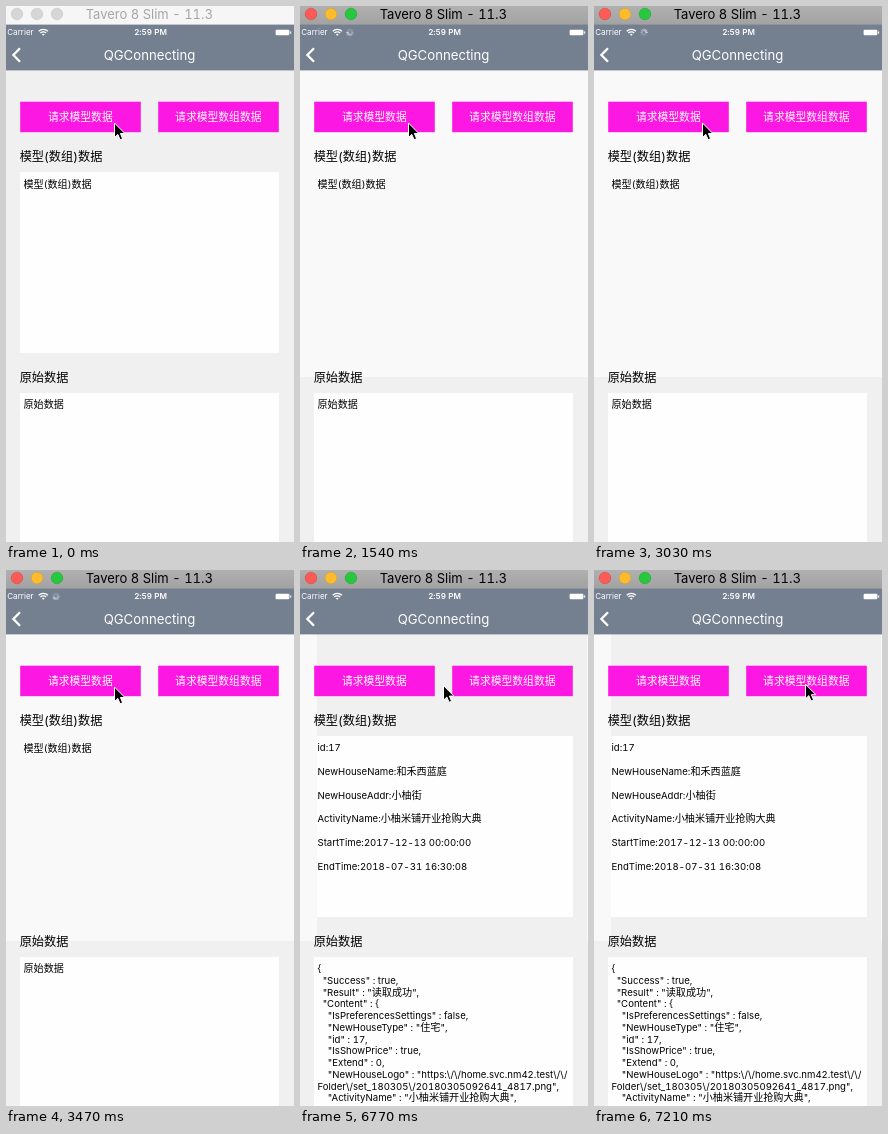
Recreate the animation shown at these times as an HTML page. Size 288 by 536 pixels, loop 8 s.

```html
<!DOCTYPE html>
<html lang="zh">
<head>
<meta charset="utf-8">
<title>Request demo</title>
<style>
  html, body { margin: 0; width: 100%; height: 100%; overflow: hidden; background: #f0f0f0; }
  svg { display: block; width: 100vw; height: 100vh; }
  text {
    font-family: Inter, "Noto Sans CJK SC", "Noto Sans CJK", sans-serif;
    font-feature-settings: "calt" 0, "tnum" 1;
    white-space: pre;
  }
  .mid { text-anchor: middle; }
  .head { font-size: 12.2px; }
  .body { font-size: 9.6px; }
  .body tspan { font-size: 10.1px; }
  .btn { font-size: 10.8px; fill: #fff; }
</style>
</head>
<body>
<svg viewBox="0 0 288 536" xmlns="http://www.w3.org/2000/svg">
  <linearGradient id="steel" x2="0" y2="1">
    <stop stop-color="#b0b0b0"/>
    <stop offset="1" stop-color="#a2a2a2"/>
  </linearGradient>
  <rect width="288" height="536" fill="#f0f0f0"/>
  <rect id="wash" y="64" width="288" height="307" fill="#f9f9f9"/>
  <rect id="fresh" x="17" y="64" width="270" height="307" fill="#f0f0f0"/>
  <rect id="topBox" y="166" height="181" fill="#fefefe"/>
  <rect x="14" y="387" width="259" height="149" fill="#fefefe"/>

  <rect id="bar" width="288" height="19"/>
  <g id="lights"></g>
  <text id="winTitle" class="mid" x="143.3" y="13" font-size="13">Tavero 8 Slim - 11.3</text>

  <rect y="18.6" width="288" height="45.8" fill="#747f90"/>
  <g fill="#fff">
    <text x="1.2" y="29.4" font-size="8.1">Carrier</text>
    <text class="mid" x="144.5" y="29.4" font-size="8.1" font-weight="600">2:59 PM</text>
    <text class="mid" x="143.5" y="54" font-size="13.2">QGConnecting</text>
    <rect x="269.6" y="23.8" width="13.8" height="5.4" rx="1.2"/>
    <rect x="284.2" y="25.3" width="1" height="2.4" rx=".5"/>
    <path d="M35.9 28.4a2.2 2.2 0 0 1 2.8 0L37.3 29.8z"/>
  </g>
  <g fill="none" stroke="#fff">
    <path d="M32.7 25.2a6.5 6.5 0 0 1 9.2 0M34.4 27a4.1 4.1 0 0 1 5.8 0" stroke-width="1.3"/>
    <path d="M14 42.3L7.4 49L14 55.7" stroke-width="2.3"/>
  </g>
  <g id="spinner" transform="translate(50 26.4)" stroke="#fff" stroke-width=".8" stroke-linecap="round"></g>

  <g fill="#fc18e2">
    <rect x="14.2" y="95.7" width="120.6" height="30.5"/>
    <rect x="152.2" y="95.7" width="120.6" height="30.5"/>
  </g>
  <text class="btn mid" x="74.3" y="115">请求模型数据</text>
  <text class="btn mid" x="212.3" y="115">请求模型数组数据</text>
  <text class="head" x="13.7" y="155.2">模型(数组)数据</text>
  <text class="head" x="13.7" y="375.7">原始数据</text>

  <g id="before"></g>
  <g id="after"></g>

  <path id="cursor" d="M0 0V14.6L3.3 11.4L5.6 16.7L8.1 15.7L5.9 10.5H10.4Z" fill="#000" stroke="#fff" stroke-width="1" stroke-linejoin="round"/>
</svg>
<script>
const LOOP = 8000, ACTIVE = 500, SPIN = 797, STEP = 148.5, LOADED = 3620, MOVE = 6770;
const NS = "http://www.w3.org/2000/svg";
const $ = id => document.getElementById(id);

function add(parent, tag, attrs) {
  const el = document.createElementNS(NS, tag);
  for (const k in attrs) el.setAttribute(k, attrs[k]);
  parent.appendChild(el);
  return el;
}

// Latin and Chinese runs have slightly different sizes
function addLine(parent, str, y) {
  const line = add(parent, "text", { class: "body", x: 17.5, y });
  for (const run of str.split(/([\u4e00-\u9fff]+)/)) {
    if (/[\u4e00-\u9fff]/.test(run)) add(line, "tspan", {}).textContent = run;
    else line.appendChild(document.createTextNode(run));
  }
}

const model = [
  "id:17",
  "NewHouseName:和禾西蓝庭",
  "NewHouseAddr:小柚街",
  "ActivityName:小柚米铺开业抢购大典",
  "StartTime:2017-12-13 00:00:00",
  "EndTime:2018-07-31 16:30:08"
];
const raw = String.raw`{
  "Success" : true,
  "Result" : "读取成功",
  "Content" : {
    "IsPreferencesSettings" : false,
    "NewHouseType" : "住宅",
    "id" : 17,
    "IsShowPrice" : true,
    "Extend" : 0,
    "NewHouseLogo" : "https:\/\/home.svc.nm42.test\/\/
Folder\/set_180305\/20180305092641_4817.png",
    "ActivityName" : "小柚米铺开业抢购大典",`.split("\n");

addLine($("before"), "模型(数组)数据", 181.5);
addLine($("before"), "原始数据", 402.2);
model.forEach((s, i) => addLine($("after"), s, 181.4 + i * 23.65));
raw.forEach((s, i) => addLine($("after"), s, 402.2 + i * 11.75));

const lights = [11, 31, 51].map(cx => add($("lights"), "circle", { cx, cy: 8, r: 5.8, "stroke-width": 0.6 }));
const lit = ["#fc5b57", "#fdbc2e", "#27c840"];
const rims = ["#e2463f", "#e0a11f", "#1dac2b"];

const SPOKES = 12;
const spokes = Array.from({ length: SPOKES }, (_, i) =>
  add($("spinner"), "path", { d: "M0 -1.8V-3.3", transform: `rotate(${i * 360 / SPOKES})` }));

const show = (id, on) => $(id).setAttribute("visibility", on ? "visible" : "hidden");

function pointer(t) {
  if (t < MOVE) return [108.5, 117];
  const left = 1 - Math.min(3, Math.floor((t - MOVE) / 146.6)) / 3;
  const rest = left ** 1.7;
  return [211.5 - 68 * rest, 114.2 + 1.4 * rest];
}

function draw(t) {
  const active = t >= ACTIVE, loaded = t >= LOADED;
  $("bar").setAttribute("fill", active ? "url(#steel)" : "#f6f6f6");
  $("winTitle").setAttribute("fill", active ? "#000" : "#a6a6a6");
  lights.forEach((c, i) => {
    c.setAttribute("fill", active ? lit[i] : "#d6d6d6");
    c.setAttribute("stroke", active ? rims[i] : "#c8c8c8");
  });

  show("wash", active);
  show("fresh", loaded);
  show("topBox", !active || loaded);
  $("topBox").setAttribute("x", loaded ? 17 : 14);
  $("topBox").setAttribute("width", loaded ? 256 : 259);
  show("before", !loaded);
  show("after", loaded);

  show("spinner", t >= SPIN && !loaded);
  const head = Math.round(Math.max(0, Math.floor((t - SPIN) / STEP)) * 1.78);
  spokes.forEach((s, i) => {
    const age = (((head - i) % SPOKES) + SPOKES) % SPOKES;
    s.setAttribute("opacity", Math.max(0.25, 0.95 - age * 0.09));
  });

  $("cursor").setAttribute("transform", `translate(${pointer(t)})`);
}

const start = performance.now();
function tick() {
  draw((performance.now() - start) % LOOP);
  requestAnimationFrame(tick);
}
tick();
</script>
</body>
</html>
```
